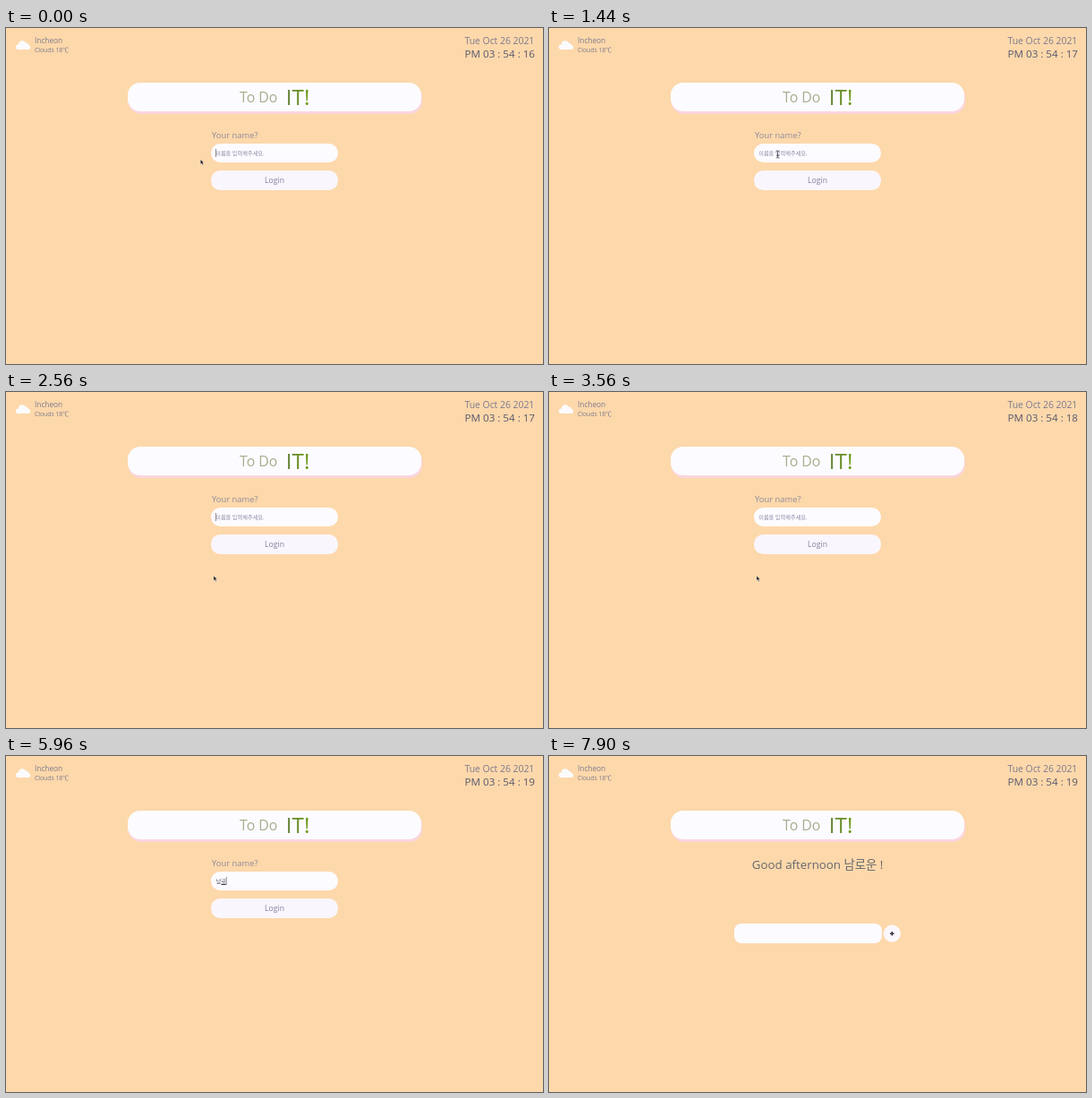
An HTML page for the animation above (8000 ms loop, 600 by 375 pixels).

```html
<!DOCTYPE html>
<html lang="ko">
<head>
<meta charset="utf-8">
<title>To Do IT!</title>
<style>
  html, body { margin: 0; width: 100%; height: 100%; overflow: hidden; background: #fdd8ab; }
  svg { display: block; width: 100vw; height: 100vh; }
  text { font-family: "Open Sans", "Noto Sans CJK KR", "Noto Sans CJK", sans-serif; fill: #7d7a8e; }
  .panel { fill: #fcfbff; }
  .glow { fill: #fbd5de; }
</style>
</head>
<body>
<svg viewBox="0 0 600 375">
  <defs>
    <linearGradient id="olive">
      <stop offset="0" stop-color="#64803a"/>
      <stop offset="1" stop-color="#6a980c"/>
    </linearGradient>
  </defs>
  <rect width="600" height="375" fill="#fdd8ab"/>

  <g class="panel">
    <circle cx="13.7" cy="21.2" r="2.8"/>
    <circle cx="18" cy="18.2" r="4"/>
    <circle cx="22" cy="19.2" r="2.8"/>
    <circle cx="24.5" cy="21.4" r="2.6"/>
    <rect x="13.7" y="18.5" width="10.8" height="5.5"/>
  </g>
  <text x="32" y="17" font-size="8.3">Incheon</text>
  <text x="32" y="27.3" font-size="6.8">Clouds 18℃</text>

  <text x="590.3" y="18.3" font-size="10.4" text-anchor="end">Tue Oct 26 2021</text>
  <text id="clock" x="591" y="33.3" font-size="11.6" text-anchor="end" style="fill:#57566c"></text>

  <rect class="glow" x="136.5" y="63" width="328.5" height="33" rx="14.5"/>
  <rect class="panel" x="136" y="61" width="328" height="32" rx="14"/>
  <text x="261" y="83" font-size="15.8" style="fill:#a9ad8e">To Do</text>
  <text x="312.8" y="85.8" font-size="24.2" style="fill:url(#olive)">IT!</text>

  <g id="login">
    <text x="230" y="123" font-size="9.4" style="fill:#918b9c">Your name?</text>
    <rect class="panel" x="229" y="129" width="142" height="21" rx="10.5"/>
    <rect x="229" y="159" width="142" height="22" rx="10.5" fill="#faf6fd"/>
    <text x="300" y="173.3" font-size="8.7" text-anchor="middle" style="fill:#847f9e">Login</text>
    <text id="hint" x="234.2" y="141.8" font-size="6.2" style="fill:#8f89a6">이름을 입력해주세요.</text>
    <text id="typed" x="234.8" y="141.8" font-size="6.1" style="fill:#45434f"></text>
    <rect id="mark" y="143" width="5.3" height=".9" fill="#33323c"/>
    <rect id="caret" y="135" width=".8" height="9" fill="#77757f"/>
  </g>

  <g id="todo">
    <text x="300" y="126" font-size="13.3" text-anchor="middle" style="fill:#66676d">Good afternoon 남로운 !</text>
    <rect class="panel" x="207" y="187" width="165" height="22" rx="8"/>
    <circle cx="383.3" cy="198.2" r="9.6" fill="#fcf7fc"/>
    <path d="M383.3 196v4.6M381 198.3h4.6" stroke="#37343d" stroke-width="1.5"/>
  </g>

  <path id="arrow" d="M0 0V5.2L1.3 4.1L2.3 6.3L3.2 5.9L2.3 3.8H3.8Z"
        fill="#17161c" stroke="#fff" stroke-width=".35"/>
  <path id="beam" d="M-1.8-4Q0-4 0-3Q0-4 1.8-4M0-3V3M-1.8 4Q0 4 0 3Q0 4 1.8 4M-1 1.3H1"
        fill="none" stroke="#3a3844" stroke-width=".8"/>
</svg>
<script>
const LOOP = 8000, TYPE_START = 3960, SUBMIT = 7320;
const GLYPH = 5.6;

// [time, text] for each keystroke, syllables being composed
const keys = [
  [3960, "ㄴ"], [4100, "나"], [4260, "남"], [4960, "남ㄹ"], [5080, "남로"],
  [6340, "남롱"], [6480, "남로우"], [6660, "남로운"]
];
// [time, x, y] of the pointer
const route = [
  [460, 217.3, 146.8], [760, 255.6, 141], [1740, 255.6, 141],
  [2040, 241.2, 172.4], [2460, 232, 205.2]
];
const ticks = [560, 3060, 5560];

const $ = id => document.getElementById(id);
const show = (id, on) => $(id).setAttribute("visibility", on ? "inherit" : "hidden");
const smooth = p => p * p * (3 - 2 * p);

function pointer(t) {
  if (t <= route[0][0]) return route[0].slice(1);
  for (let i = 1; i < route.length; i++) {
    const [t0, x0, y0] = route[i - 1], [t1, x1, y1] = route[i];
    if (t < t1) {
      const p = smooth((t - t0) / (t1 - t0));
      return [x0 + (x1 - x0) * p, y0 + (y1 - y0) * p];
    }
  }
  return route[route.length - 1].slice(1);
}

function drawInput(t) {
  const typing = t >= TYPE_START;
  const last = keys.filter(k => k[0] <= t).pop();
  const text = last ? last[1] : "";
  const end = 234.8 + text.length * GLYPH;
  $("typed").textContent = text;
  $("mark").setAttribute("x", end - GLYPH);
  $("caret").setAttribute("x", typing ? end - 0.2 : 234);
  show("hint", !typing);
  show("mark", typing);
  show("caret", typing || t < 700 || (t >= 2320 && t < 3560));
}

function drawPointer(t) {
  const [x, y] = pointer(t);
  const inField = x > 229 && x < 371 && y > 129 && y < 150;
  const visible = t < TYPE_START;
  for (const id of ["arrow", "beam"]) {
    $(id).setAttribute("transform", `translate(${x} ${y})`);
    show(id, visible && inField === (id === "beam"));
  }
}

function draw(t) {
  const seconds = 16 + ticks.filter(k => k <= t).length;
  $("clock").textContent = `PM 03 : 54 : ${seconds}`;
  drawInput(t);
  drawPointer(t);
  $("login").style.display = t < SUBMIT ? "" : "none";
  $("todo").style.display = t < SUBMIT ? "none" : "";
}

const start = performance.now();
function frame() {
  draw((performance.now() - start) % LOOP);
  requestAnimationFrame(frame);
}
draw(0);
requestAnimationFrame(frame);
</script>
</body>
</html>
```
